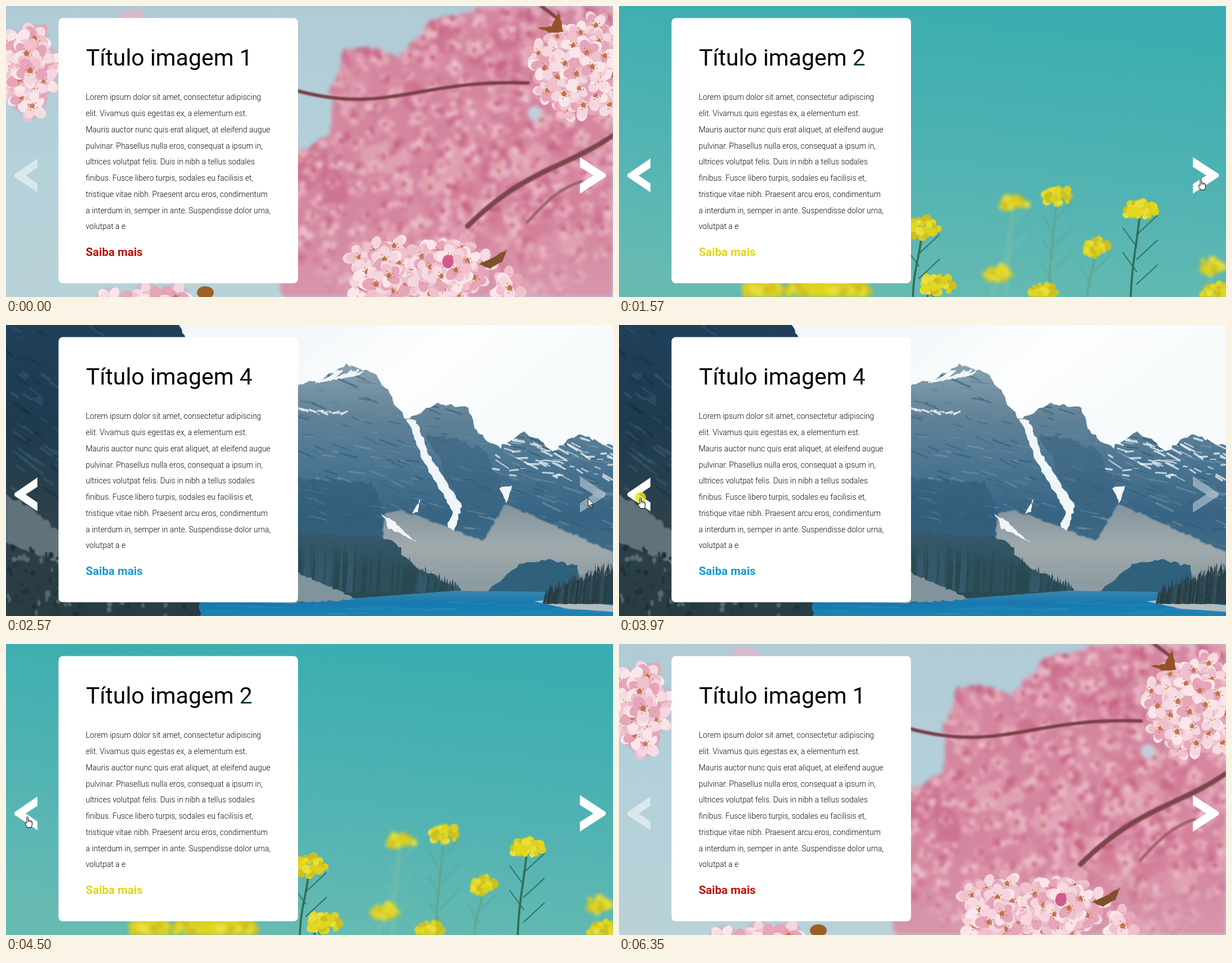
Write an HTML page with a canvas that moves like this. It is 1081 px wide and 518 px high and loops after 6620 ms.

```html
<!DOCTYPE html>
<html lang="pt">
<head>
<meta charset="utf-8">
<title>Slider</title>
<style>
html, body { margin: 0; width: 100%; height: 100%; overflow: hidden; background: #b5d0d9; }
canvas, svg { position: absolute; left: 0; top: 0; width: 1081px; height: 518px; }
text { font-family: Roboto, sans-serif; white-space: pre; }
.title { font-size: 41px; }
.body { font-size: 13.95px; font-weight: 300; fill: #0c0c0c; }
.link { font-size: 20.5px; font-weight: 700; }
</style>
</head>
<body>
<div id="scenes"></div>
<svg viewBox="0 0 1081 518">
  <defs>
    <linearGradient id="ink" gradientUnits="userSpaceOnUse" x1="0" y1="80" x2="0" y2="106">
      <stop/><stop id="inkEnd" offset="1"/>
    </linearGradient>
  </defs>
  <rect x="93.5" y="21.5" width="426.5" height="472" rx="7.5" fill="#fff"/>
  <text class="title" x="142.5" y="105.5">Título imagem <tspan id="digit" fill="url(#ink)">1</tspan></text>
  <g id="body"></g>
  <text class="link" id="link" x="142" y="445">Saiba mais</text>
  <path id="prev" fill="#fff" d="M56 271.5L15 299.5V304L56 331.5V316L35 301.7L56 288Z"/>
  <path id="next" fill="#fff" d="M1022 269L1068 299V304L1022 334V317L1046 301.5L1022 286.5Z"/>
  <g id="pointer">
    <circle id="press" r="10" fill="#e8e31c" opacity=".8"/>
    <path id="arrow" fill="#fff" stroke="#000" d="M.5 .5V15L3.7 12L6 17.2L8.3 16.2L6 11.2H11Z"/>
    <g id="hand" transform="translate(-5 0)" stroke="#000" fill="none">
      <path fill="#fff" d="M4 1.5C4 .2 6.500 .2 6.500 1.500V7Q9 5.500 9 7.600Q11.300 6.500 11.300 8.400Q13.500 7.500 13.500 9.500V14Q13.500 16 12 19.500H5Q1 13.500 .8 11.500Q1.500 9.500 4 12Z"/>
      <path d="M6.500 7V10M9 7.600V10.500M11.300 8.400V11" stroke-width=".8"/>
    </g>
  </g>
</svg>
<script>
const W = 1081, H = 518, LOOP = 6620, TICK = 70;
const $ = id => document.getElementById(id);

// ---- drawing helpers, all working on the current context g ----
let g, seed = 7;
const rnd = (a, b) => {
  seed = seed * 16807 % 2147483647;
  return a + (b - a) * seed / 2147483647;
};
const pick = list => list[Math.floor(rnd(0, list.length))];
const repeat = (n, draw) => { for (let i = 0; i < n; i++) draw(i); };
const newCanvas = () => Object.assign(document.createElement('canvas'), { width: W, height: H });

function grad(x0, y0, x1, y1, ...colors) {
  const fill = g.createLinearGradient(x0, y0, x1, y1);
  colors.forEach((c, i) => fill.addColorStop(i / (colors.length - 1), c));
  return fill;
}

function fillAll(fill) {
  g.fillStyle = fill;
  g.fillRect(0, 0, W, H);
}

// closed shape through a few key points, with a rough edge
function poly(fill, rough, ...pts) {
  const n = pts.length;
  g.beginPath();
  for (let i = 0; i < n; i += 2) {
    const x = pts[i], y = pts[i + 1];
    const dx = pts[(i + 2) % n] - x, dy = pts[(i + 3) % n] - y;
    const parts = Math.ceil(Math.hypot(dx, dy) / (4 + rough));
    for (let k = 0; k < parts; k++)
      g.lineTo(x + dx * k / parts + rnd(-rough, rough), y + dy * k / parts + rnd(-rough, rough));
  }
  g.closePath();
  g.fillStyle = fill;
  g.fill();
}

// skyline filled down to the bottom edge
const ridge = (fill, rough, ...pts) => poly(fill, rough, ...pts, pts.at(-2), 560, pts[0], 560);

function blob(x, y, rx, fill, ry = rx, turn = 0) {
  g.beginPath();
  g.ellipse(x, y, rx, ry, turn, 0, 7);
  g.fillStyle = fill;
  g.fill();
}

function stroke(color, width, x, y, ...rest) {
  g.beginPath();
  g.moveTo(x, y);
  if (rest.length > 2) g.bezierCurveTo(...rest);
  else g.lineTo(...rest);
  g.strokeStyle = color;
  g.lineWidth = width;
  g.lineCap = 'round';
  g.stroke();
}

function soft(radius, draw) {
  const base = g, sheet = newCanvas();
  g = sheet.getContext('2d');
  draw();
  g = base;
  g.filter = radius ? `blur(${radius}px)` : 'none';
  g.drawImage(sheet, 0, 0);
  g.filter = 'none';
}

// n points spread evenly over an ellipse, outermost first
function spread(n, x, y, rx, ry, draw) {
  for (let i = n - 1; i >= 0; i--) {
    const d = Math.sqrt((i + .5) / n), a = i * 2.4;
    draw(x + Math.cos(a) * d * rx, y + Math.sin(a) * d * ry);
  }
}

// ---- scenes ----
function blossom(x, y, r, petals, heart) {
  const spin = rnd(0, 6);
  repeat(9, k => {
    const a = spin + k * 2.51, d = r * (k < 5 ? .58 : .36);
    blob(x + Math.cos(a) * d, y + Math.sin(a) * d, r * .46, pick(petals), r * .34, a);
  });
  blob(x, y, r * .16, heart);
}

function cluster(n, x, y, rx, ry) {
  spread(n, x, y, rx, ry, (bx, by) => {
    blob(bx, by, 26, '#dc9db255');
    const r = rnd(24, 31);
    blossom(bx, by, r, ['#f5d6de', '#f0c0cd', '#fae6ea', '#e6a5b9', '#f6dce2'], '#c6714e');
    spread(9, bx, by, r * .34, r * .34, (sx, sy) => blob(sx, sy, 1.1, '#b97a35'));
  });
}

function spring() {
  fillAll(grad(0, 0, 0, H, '#b0cbd6', '#b4d1da', '#b9d2d8'));
  soft(3, () => {
    poly('#d4869f', 6, 580, 150, 600, 80, 640, 70, 700, 92, 760, 25, 940, -20, 1120, -20, 1120, 560,
      490, 560, 490, 285, 575, 225);
    g.globalCompositeOperation = 'source-atop';
    repeat(60, () => blob(rnd(520, W), rnd(0, H), rnd(20, 50),
      pick(['#c96788', '#dd94ac', '#e8b3c0', '#d47893']) + '99', rnd(16, 30), rnd(0, 3)));
    spread(260, 800, 235, 390, 320, (x, y) =>
      blossom(x + rnd(-9, 9), y + rnd(-9, 9), rnd(13, 24),
        ['#eab2c1aa', '#d98aa4aa', '#e49fb3aa', '#c96385aa', '#f0c6d0aa'], pick(['#a8524e', '#b06248', '#b4466c'])));
    fillAll(grad(0, 380, 0, H, '#dca5b500', '#dca5b588'));
    blob(942, 191, 13, '#c4cedb');
  });
  soft(.8, () => {
    stroke('#a0616c', 5, 1025, 312, 985, 325, 960, 350, 928, 385);
    stroke('#7c3f49', 6, 515, 150, 680, 195, 730, 130, 930, 137);
    stroke('#7c444b', 9, 1090, 224, 1000, 290, 930, 285, 822, 392);
    stroke('#75434a', 6, 948, -4, 982, 22);
  });
  soft(3, () => blob(225, 18, 24, '#d9b9c8', 12));
  cluster(28, 1032, 108, 92, 82);
  cluster(14, 672, 480, 52, 68);
  cluster(15, 790, 470, 62, 52);
  cluster(3, 893, 502, 10, 14);
  cluster(14, 35, 115, 42, 72);
  cluster(7, 245, 528, 76, 18);
  poly('#925326', 1, 946, 38, 972, 36, 985, 10, 992, 46, 970, 48);
  poly('#80502a', 1, 842, 460, 868, 447, 893, 434, 884, 455, 862, 467);
  blob(787, 455, 10, '#cf5b8c', 12);
  blob(355, 510, 15, '#9a6122', 11);
}

function flower(x, y, r, stem) {
  const foot = x - r * .5;
  stroke(stem, r / 9, x, y, x - 4, y + 60, foot, 460, foot, 540);
  for (let d = 45, side = 1; d < 500 - y; d += 22, side = -side)
    stroke(stem, r / 18, x - 6, y + d, x + side * r * .9, y + d - 34);
  spread(24, x, y, r * .85, r * .48, (px, py) =>
    blob(px + rnd(-3, 3), py + rnd(-3, 3), r * rnd(.13, .26), pick(['#e2d71f', '#dccf20', '#e9df3a', '#cdbf22'])));
}

function meadow() {
  fillAll(grad(620, 0, 560, H, '#3badb0', '#48b0b1', '#56b5b3', '#66bab2'));
  soft(3, () => {
    for (const [x, y] of [[702, 350], [676, 477], [1056, 465]]) flower(x, y, 27, '#86c4a5');
    spread(4, 325, 502, 150, 6, (x, y) => flower(x, y, 44, '#86c4a5'));
  });
  soft(1, () => {
    for (const [x, y] of [[780, 338], [849, 431], [755, 510], [1062, 511]]) flower(x, y, 30, '#60a48b');
  });
  for (const [x, y] of [[540, 396], [928, 362], [566, 496]]) flower(x, y, 34, '#33705a');
}

function dusk() {
  fillAll(grad(260, 0, 480, H, '#fdd273', '#fdc56c', '#f9b168', '#e58f6b'));
  soft(12, () => blob(20, 110, 170, 'rgba(255,226,126,.6)', 190));
  soft(2, () => ridge(grad(0, 10, 0, 300, '#f9ac66', '#f9b268', '#f9b46a'), 2,
    520, 110, 625, 42, 700, 26, 835, 40, 900, 24, 1100, 4));
  ridge(grad(0, 295, 0, H, '#efa068', '#e08a6a', '#d47a6e'), 1, -9, 299, 95, 300, 200, 320);
  ridge(grad(520, 250, 640, H, '#d98460', '#e2906a', '#dd846b', '#d0776f'), 1.3,
    510, 294, 565, 280, 632, 254, 700, 250, 740, 260, 1025, 374, 1100, 376);
  soft(9, () => repeat(13, i => {
    const x = 150 + i * 55, y = i % 4 * 30 - 20, w = rnd(8, 22);
    poly(`rgba(255,190,120,${rnd(.08, .2)})`, 0, x, y, x + w, y, x + 520 + w * 3, 450, x + 480, 460);
  }));
  soft(1, () => {
    ridge(grad(0, 390, 0, H, '#d57d68', '#cf7370'), 1, -9, 388, 95, 428, 520, 422, 700, 466, 840, 530);
    blob(746, 540, 98, grad(0, 450, 0, H, '#a65e6c', '#c3706e'), 90);
  });
  spread(40, 1060, 482, 28, 14, (x, y) => blob(x, y, rnd(3, 6), '#70435f'));
  spread(20, 993, 500, 12, 16, (x, y) => blob(x, y, rnd(3, 6), '#70435f'));
  ridge('#784862', 3, 975, 516, 1030, 512, 1060, 480, 1090, 490);
}

function lake() {
  fillAll(grad(520, 0, 760, 300, '#f3f7f9', '#fdfefe', '#f6fafb'));
  const rocks = ['#2b5673', '#7f9aa9', '#355f7c', '#6d8c9f', '#567c93'];
  soft(.5, () => {
    ridge(grad(0, 70, 0, 430, '#88a3b1', '#638398', '#4a7592', '#376483', '#456f87'), 3,
      500, 110, 548, 100, 606, 71, 655, 83, 712, 168, 766, 140, 822, 146, 842, 195, 880, 218, 922, 190, 975, 224, 1018, 195, 1100, 222);
    g.globalCompositeOperation = 'source-atop';
    repeat(420, () => {
      const x = rnd(510, W), y = rnd(80, 400), n = rnd(8, 34);
      stroke(pick(rocks) + '88', rnd(1, 4), x, y, x + n, y + n * rnd(.1, .5));
    });
    poly('#2d587588', 5, 520, 275, 650, 280, 700, 400, 520, 390);
    poly('#365f7d88', 5, 745, 190, 850, 220, 900, 320, 810, 320);
    repeat(70, () => {
      const x = rnd(860, W), y = rnd(195, 270), n = rnd(6, 24);
      stroke('#eff5f8bb', rnd(1, 4), x, y, x + n, y + n * rnd(-.2, .7));
    });
    repeat(16, i => stroke('#eff5f8', rnd(2, 5), 552 + i * 5, 102 - i * .9, 575 + i * 4, 86 + rnd(-9, 6)));
    repeat(12, i => stroke('#eff5f8cc', rnd(1, 4), 520 + i * 7, 148 + i, 530 + i * 7, 152 + rnd(0, 9)));
  });
  soft(1, () => ridge(grad(0, 330, 0, 460, '#87979f', '#a0aaad', '#8d9ca1'), 2,
    672, 336, 705, 330, 850, 384, 890, 318, 1000, 368, 1100, 412));
  const snow = (...pts) => poly('#eff5f8', 2, ...pts);
  snow(714, 166, 730, 168, 756, 235, 812, 322, 798, 366, 786, 360, 795, 332, 742, 240);
  snow(670, 336, 688, 347, 732, 388, 682, 362);
  snow(880, 290, 900, 288, 890, 318);
  snow(725, 335, 738, 308, 733, 334);

  const firs = (n, x0, x1, top, base, colors) => repeat(n, i => {
    const f = i / n, x = x0 + (x1 - x0) * f, y = top(f) + rnd(-8, 8), w = rnd(4, 7);
    poly(pick(colors), .8, x - w, Math.max(base, y + 20), x, y, x + w, Math.max(base, y + 20));
  });
  ridge(grad(0, 365, 0, 480, '#365a6e', '#294951'), 4, 500, 365, 690, 380, 720, 425, 812, 475);
  firs(60, 520, 810, f => 385 + 75 * f * f, 476, ['#2e505b', '#294951', '#35596a']);
  ridge('#2f617d', 3, 852, 478, 908, 430, 960, 417, 1020, 430);
  ridge(grad(0, 472, 0, H, '#3e87ae', '#1678ae', '#1c83b7'), 0, 290, 492, 520, 494, 800, 473, 960, 475, 1100, 500);
  repeat(28, () => {
    const x = rnd(350, 1020), y = rnd(486, 515);
    stroke('#5aa3c666', 1, x, y, x + rnd(20, 80), y);
  });
  poly('#81939b', 2, 500, 432, 600, 476, 622, 488, 500, 496);
  poly('#b2bcbd', 0, 940, 492, 975, 488, 1090, 500, 1090, 511, 1000, 505);
  firs(60, 962, 1090, f => 470 - 55 * f, 496, ['#2a424c', '#354f57', '#253a43']);

  ridge(grad(0, 0, 0, H, '#20405a', '#1e3b4e', '#2d414b', '#293c42'), 3, -9, -9, 300, -9, 322, 24, 348, 540);
  soft(1, () => {
    repeat(110, () => {
      const x = rnd(0, 300), y = rnd(0, 290), n = rnd(8, 28);
      stroke(pick(['#35607f', '#142b3c', '#3f6278']) + '90', rnd(1, 5), x, y, x + n, y + n * .7);
    });
    poly('#61727b', 4, -9, 300, 30, 318, 100, 372, 100, 430, -9, 380);
    repeat(160, () => blob(rnd(0, 330), rnd(390, H), rnd(2, 5), pick(['#1c3038', '#566870', '#22383f']), rnd(2, 7)));
  });
}

for (const draw of [spring, meadow, dusk, lake]) {
  const canvas = newCanvas();
  g = canvas.getContext('2d');
  draw();
  $('scenes').append(canvas);
}
const scenes = [...$('scenes').children];

// ---- card text ----
[
  'Lorem ipsum dolor sit amet, consectetur adipiscing',
  'elit. Vivamus quis egestas ex, a elementum est.',
  'Mauris auctor nunc quis erat aliquet, at eleifend augue',
  'pulvinar. Phasellus nulla eros, consequat a ipsum in,',
  'ultrices volutpat felis. Duis in nibh a tellus sodales',
  'finibus. Fusce libero turpis, sodales eu facilisis et,',
  'tristique vitae nibh. Praesent arcu eros, condimentum',
  'a interdum in, semper in ante. Suspendisse dolor urna,',
  'volutpat a e'
].forEach((line, i) => {
  const row = document.createElementNS('http://www.w3.org/2000/svg', 'text');
  row.setAttribute('class', 'body');
  row.setAttribute('x', 142);
  row.setAttribute('y', 167.3 + i * 28.75);
  row.textContent = line;
  $('body').append(row);
});

// ---- timeline ----
const themes = [
  { link: '#b5140d', ink: '#000' },
  { link: '#dfd61b', ink: '#1d4a30' },
  { link: '#983319', ink: '#a03a20' },
  { link: '#159bd3', ink: '#25363c' }
];
const clicks = [
  { down: -100, shown: 0, slide: 1 },
  { down: 1050, shown: 1570, slide: 2 },
  { down: 1970, shown: 2040, slide: 3 },
  { down: 2440, shown: 2570, slide: 4 },
  { down: 3970, shown: 4020, slide: 3 },
  { down: 4420, shown: 4500, slide: 2 },
  { down: 4900, shown: 4970, slide: 1 }
];
// each move bends past a control point and ends where the next begins
const moves = [
  { from: 70, to: 890, bend: [985, 385], end: [1036, 308] },
  { from: 2760, to: 3750, bend: [537, 144], end: [38, 307] },
  { from: 5300, to: 5990, bend: [500, 275], end: [1078, 420] },
  { from: 5990, to: 6350, bend: [1046, 455], end: [1066, 512] }
];

const show = (id, on) => { $(id).style.display = on ? '' : 'none'; };

function pointerAt(t) {
  let at = [961, 474];
  for (const { from, to, bend, end } of moves) {
    if (t < from) break;
    const p = Math.min(1, Math.floor((t - from) / TICK) * TICK / (to - from - TICK));
    const u = 1 - (1 - p) ** 2.5;
    at = at.map((a, i) => Math.round((1 - u) ** 2 * a + 2 * u * (1 - u) * bend[i] + u * u * end[i]));
  }
  return at;
}

function render(t) {
  const { slide } = clicks.findLast(c => t >= c.shown);
  const { link, ink } = themes[slide - 1];
  const first = slide === 1, last = slide === themes.length;
  scenes.forEach((c, i) => { c.style.visibility = i === slide - 1 ? 'visible' : 'hidden'; });
  $('digit').textContent = slide;
  $('inkEnd').setAttribute('stop-color', ink);
  $('link').setAttribute('fill', link);
  $('prev').setAttribute('opacity', first ? .5 : 1);
  $('next').setAttribute('opacity', last ? .4 : 1);

  const [x, y] = pointerAt(t);
  const hand = y > 270 && y < 334 && (x < 56 && !first || x > 1022 && !last);
  show('pointer', t >= 70 && t < 6350);
  show('hand', hand);
  show('arrow', !hand);
  show('press', clicks.some(c => t >= c.down && t < Math.min(c.down + 60, c.shown)));
  $('pointer').setAttribute('transform', `translate(${x} ${y})`);
}

const began = performance.now();
function frame() {
  render((performance.now() - began) % LOOP);
  requestAnimationFrame(frame);
}
frame();
</script>
</body>
</html>
```
